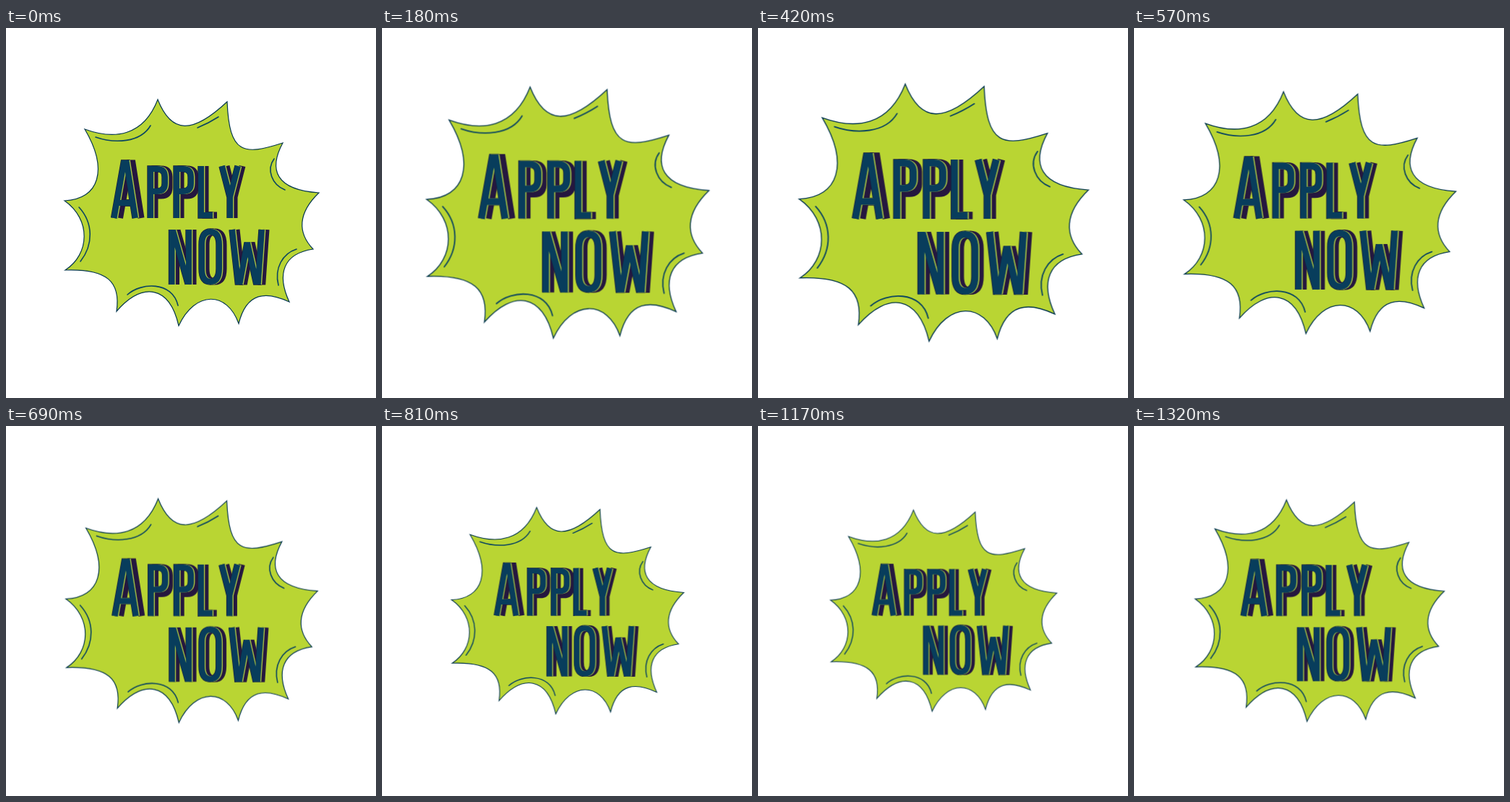
These frames come from a looping animation (512 by 512 pixels, 1350 ms). An HTML page:

```html
<!DOCTYPE html>
<html lang="en">
<head>
<meta charset="utf-8">
<title>Apply now</title>
<style>
  html, body { margin: 0; width: 100%; height: 100%; overflow: hidden; background: #fff; }
  svg { display: block; width: 100vw; height: 100vh; }
  #badge { transform-origin: 256px 256px; }
  .burst { fill: #b9d533; stroke: #06384f; stroke-width: 1.2; }
  .accents { fill: none; stroke: #0b4560; stroke-width: 1.6; stroke-linecap: round; }
  .lettering { fill: none; }
  .shade { stroke: #25173f; stroke-width: 9; }
  .edge { stroke: #1a1c3c; stroke-width: 9.4; }
  .inline { stroke: #a9c644; stroke-width: 8; }
  .face { stroke: #083d5c; stroke-width: 8; }
</style>
</head>
<body>
<svg viewBox="0 0 512 512" role="img" aria-label="APPLY NOW">
  <defs>
    <path id="A" d="M149.5 263L163 187H167L179 263M154 242H176"/>
    <path id="P" d="M200 263V195H209Q220 195 220 206V215Q220 226 209 226H200"/>
    <path id="Pshade" d="M200 263V195H209Q220 195 220 206V221Q220 232 209 232H200"/>
    <path id="L" d="M270 191V259H286"/>
    <path id="Y" d="M299 191L310 234V263M321 191L310 234"/>
    <path id="N" d="M229.5 355V279M231 280L252 354M253 355V279"/>
    <path id="O" d="M271 300Q271 282 283 282T295 300V333Q295 351 283 351T271 333Z"/>
    <path id="W" d="M313 279L321 351H324L334 297L346 351H349L354 279"/>
  </defs>
  <g id="badge">
    <path class="burst" d="M109 140
      C150 155 190 150 210 99
      C229 147 258 147 306 102
      C309 174 328 177 383 159
      C363 196 373 224 433 228
      C404 256 403 283 425 306
      C384 312 374 340 392 379
      C360 364 333 365 322 409
      C306 364 262 363 239 412
      C226 356 189 351 153 392
      C159 351 140 333 82 335
      C116 313 118 265 81 239
      C129 237 142 196 109 140Z"/>
    <path class="accents" d="M124 151C150 160 186 159 200 135
      M265 138Q280 132 294 123
      M371 181C360 196 368 217 386 224
      M101 248C121 270 121 300 103 323
      M168 369C187 352 230 350 238 384
      M402 306C383 312 371 332 377 356"/>
    <g class="lettering" id="lettering"></g>
  </g>
</svg>
<script>
  const PERIOD = 1350, STEPS = 45, SWING = 0.148;

  const use = (id, x, layer) => `<use href="#${id}" x="${x}" class="${layer}"/>`;
  const letter = (id, { x = 0, depth = 6, shade = id } = {}) =>
    use(shade, x + depth, 'shade') + use(id, x, 'edge') +
    use(id, x + 1.4, 'inline') + use(id, x, 'face');

  document.getElementById('lettering').innerHTML = [
    letter('A', { depth: 8 }),
    letter('P', { shade: 'Pshade' }),
    letter('P', { shade: 'Pshade', x: 36 }),
    ...['L', 'Y', 'N', 'O', 'W'].map(id => letter(id))
  ].join('');

  // Sine pulse, held for one step at a time
  const pulse = Array.from({ length: STEPS + 1 }, (_, i) => ({
    transform: `scale(${1 + SWING * Math.sin(2 * Math.PI * i / STEPS)})`,
    easing: 'step-end'
  }));
  document.getElementById('badge').animate(pulse, { duration: PERIOD, iterations: Infinity });
</script>
</body>
</html>
```
